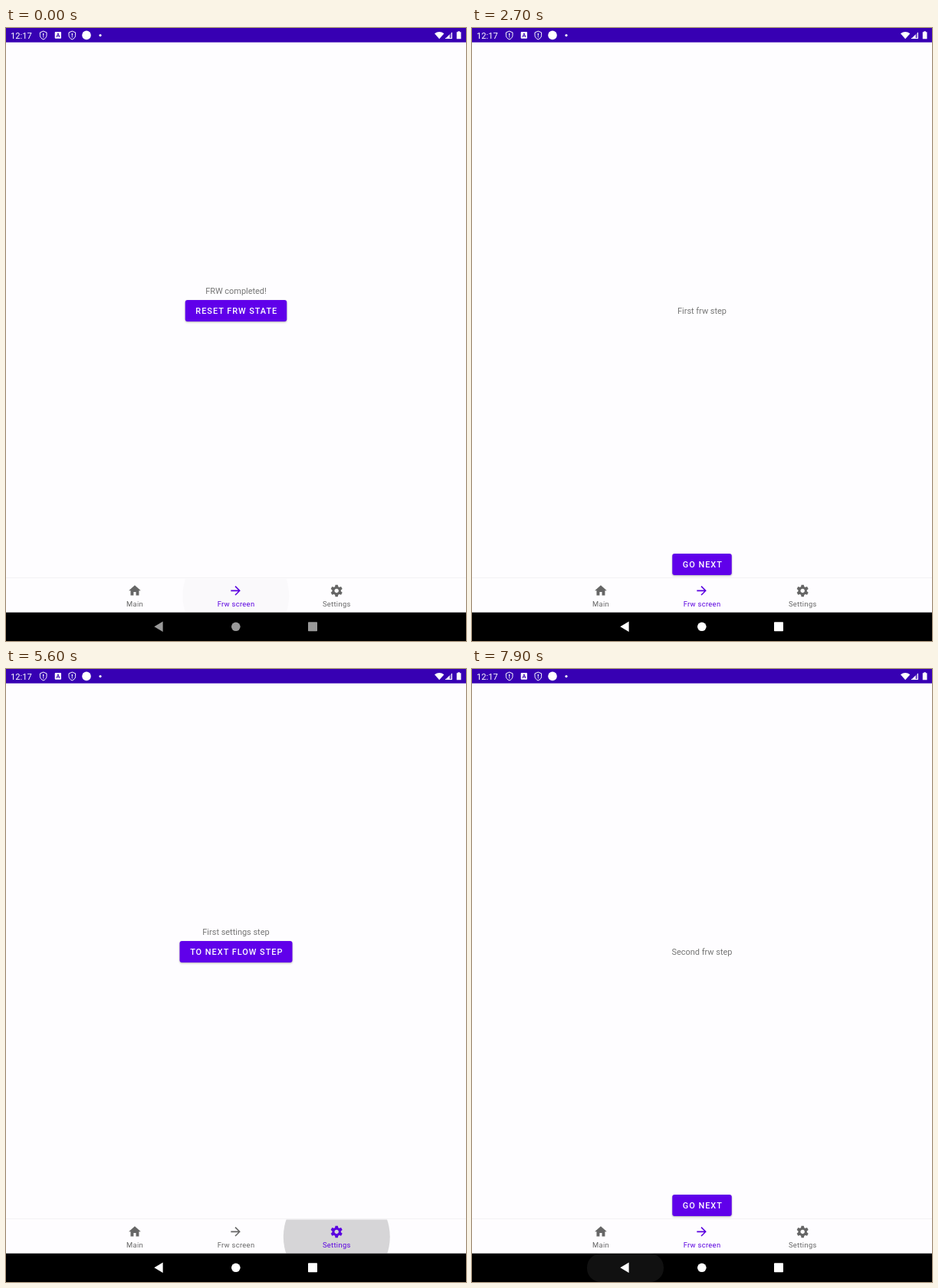
These frames come from a looping animation (600 by 800 pixels, 8 s). An HTML page:

```html
<!DOCTYPE html>
<html lang="en">
<head>
<meta charset="utf-8">
<title>Step flow</title>
<style>
  html, body { margin: 0; width: 100%; height: 100%; overflow: hidden; background: #fefdff; }
  svg { display: block; width: 600px; height: 800px; font: 10.94px Roboto, sans-serif; }
  .label { fill: #757575; text-anchor: middle; }
  #caption { fill: #fff; font-weight: 500; letter-spacing: .98px; text-anchor: middle; }
  .tab { fill: #666; color: #666; }
  .tab.on { fill: #5a00e0; color: #5a00e0; }
  .tab text { font-size: 9.38px; letter-spacing: .31px; text-anchor: middle; }
</style>
</head>
<body>
<svg viewBox="0 0 600 800">
  <defs>
    <clipPath id="buttonClip"><rect id="buttonShape" height="28" rx="3"/></clipPath>
    <clipPath id="tabClip"><rect y="718.5" width="600" height="44"/></clipPath>
    <g id="shield">
      <path d="M0-5.2 4.3-3.4V.3C4.3 2.8 2.4 4.7 0 5.6-2.4 4.7-4.3 2.8-4.3.3V-3.4Z" fill="none" stroke="#fff"/>
      <path d="M-.6-2.6H.6V.9H-.6ZM-.6 1.8H.6V3H-.6Z"/>
    </g>
    <path id="tooth" d="M-2.9-6-2.1-9.9H2.1L2.9-6Z"/>
  </defs>

  <rect width="600" height="800" fill="#fefdff"/>

  <rect width="600" height="18.7" fill="#3700b3"/>
  <g fill="#fff">
    <text x="6" y="13.6" font-size="11.2">12:17</text>
    <use href="#shield" x="48.7" y="9.3"/>
    <rect x="63.7" y="5" width="8.3" height="8.8" rx="1"/>
    <path d="M65.8 12 67.9 6.8 70 12M66.6 10.4H69.2" fill="none" stroke="#3700b3"/>
    <use href="#shield" x="86.3" y="9.3"/>
    <circle cx="105" cy="9.4" r="5.8"/>
    <circle cx="123" cy="9.6" r="1.6"/>
    <path d="M559 7.2Q565.2 2.6 571.4 7.2L565.2 14.2Z"/>
    <path d="M573 14 582 5V14Z" fill-opacity=".35"/>
    <path d="M573 14 578.5 8.5V14ZM581 6H582V14H573V13H581Z"/>
    <path d="M587.8 5.2H589.4V4.2H591.9V5.2H593.5V14.2H587.8Z"/>
  </g>

  <text id="message" class="label" x="300"></text>
  <rect id="button" height="28" rx="3" fill="#6000ea"/>
  <circle id="buttonRipple" fill="#fff" fill-opacity=".24" clip-path="url(#buttonClip)"/>
  <text id="caption" x="300.8"></text>

  <rect y="717" width="600" height="1" fill="#f3f2f4"/>
  <circle id="tabRipple" cy="741" r="69.5" clip-path="url(#tabClip)"/>
  <g class="tab">
    <path transform="translate(158.6 725)scale(.781)" d="M10 20v-6h4v6h5v-8h3L12 3 2 12h3v8z"/>
    <text x="168" y="754.7">Main</text>
  </g>
  <g class="tab">
    <path transform="translate(290.2 725)scale(.781)" d="M12 4l-1.41 1.41L16.17 11H4v2h12.17l-5.58 5.59L12 20l8-8z"/>
    <text x="300" y="754.7">Frw screen</text>
  </g>
  <g class="tab">
    <g transform="translate(431.2 734.4)scale(.781)">
      <circle r="5.4" fill="none" stroke="currentColor" stroke-width="3.8"/>
      <g id="teeth"></g>
    </g>
    <text x="431.3" y="754.7">Settings</text>
  </g>

  <rect y="762.7" width="600" height="37.3"/>
  <rect id="backRipple" y="763" height="37" rx="18" fill="#fff"/>
  <g id="keys">
    <path d="M193.3 781.2 204.6 774.6V787.9Z"/>
    <circle cx="299.8" cy="781.3" r="5.8"/>
    <rect x="394" y="775.3" width="12" height="12" rx=".8"/>
  </g>
</svg>
<script>
const LOOP = 8000, STEP = 100;

// message, caption, button width, button top, active tab
const SCREENS = {
  done: ['FRW completed!', 'RESET FRW STATE', 132.5, 355, 1],
  first: ['First frw step', 'GO NEXT', 77.5, 686, 1],
  second: ['Second frw step', 'GO NEXT', 77.5, 686, 1],
  third: ['Third frw step', 'COMPLETE FRW', 118.5, 686, 1],
  settings: ['First settings step', 'TO NEXT FLOW STEP', 147, 355, 2]
};
const TIMELINE = [
  [0, 'done'], [1200, 'first'], [1900, 'second'], [2200, 'first'], [3100, 'second'],
  [3600, 'third'], [4600, 'second'], [5600, 'settings'], [6300, 'second'],
  [7100, 'third'], [7600, 'second']
];
const BUTTON_TAPS = [1000, 1800, 2900, 3400, 6900];
const BACK_TAPS = [2000, 4400, 7400];
const TAB_TAPS = [[-500, 299.8], [5400, 431.3], [6100, 299.8]];

const el = id => document.getElementById(id);
const set = (node, attrs) => {
  for (const name in attrs) node.setAttribute(name, attrs[name]);
};
const tabs = document.querySelectorAll('.tab');
const age = (taps, t, life) => {
  const start = taps.find(tap => t >= tap && t < tap + life);
  return start === undefined ? -1 : t - start;
};

el('teeth').innerHTML = Array.from({ length: 6 }, (_, i) =>
  `<use href="#tooth" transform="rotate(${i * 60})"/>`).join('');

function drawScreen(t) {
  const name = TIMELINE.filter(([start]) => start <= t).pop()[1];
  const [message, caption, width, top, active] = SCREENS[name];
  const box = { x: 300 - width / 2, y: top, width };
  const pressed = age(BUTTON_TAPS, t, 200);

  el('message').textContent = message;
  set(el('message'), { y: top === 355 ? 346.8 : 373.2 });
  el('caption').textContent = caption;
  set(el('caption'), { y: top + 18.2 });
  set(el('button'), box);
  set(el('buttonShape'), box);
  el('button').style.filter = pressed < 0
    ? 'drop-shadow(0 1px 1px rgba(0,0,0,.3))'
    : 'drop-shadow(0 2px 2px rgba(0,0,0,.4))';
  set(el('buttonRipple'), {
    cx: 299.5, cy: top + 5,
    r: pressed < 0 ? 0 : 34.5 + pressed * .4
  });
  tabs.forEach((tab, i) => tab.classList.toggle('on', i === active));
}

function drawTabRipple(t) {
  const tap = TAB_TAPS.find(([start]) => t >= start && t < start + 700);
  const a = tap ? t - tap[0] : 0;
  set(el('tabRipple'), {
    cx: tap ? tap[1] : 0,
    r: Math.min(69.5, 35 + a * .175),
    opacity: tap ? Math.max(.015, .157 * Math.min(1, (533 - a) / 333)) : 0
  });
}

function drawBackRipple(t) {
  const a = age(BACK_TAPS, t, 600);
  const width = Math.min(100, 50 + a * .25);
  set(el('backRipple'), {
    x: 200 - width / 2, width,
    opacity: a < 0 ? 0 : .2 * Math.min(.4 + a / 300, 1, (650 - a) / 450)
  });
  set(el('keys'), { fill: t < BACK_TAPS[0] ? '#999' : '#fff' });
}

function frame(now) {
  const t = Math.floor(now % LOOP / STEP) * STEP;
  drawScreen(t);
  drawTabRipple(t);
  drawBackRipple(t);
  requestAnimationFrame(frame);
}
frame(0);
</script>
</body>
</html>
```
